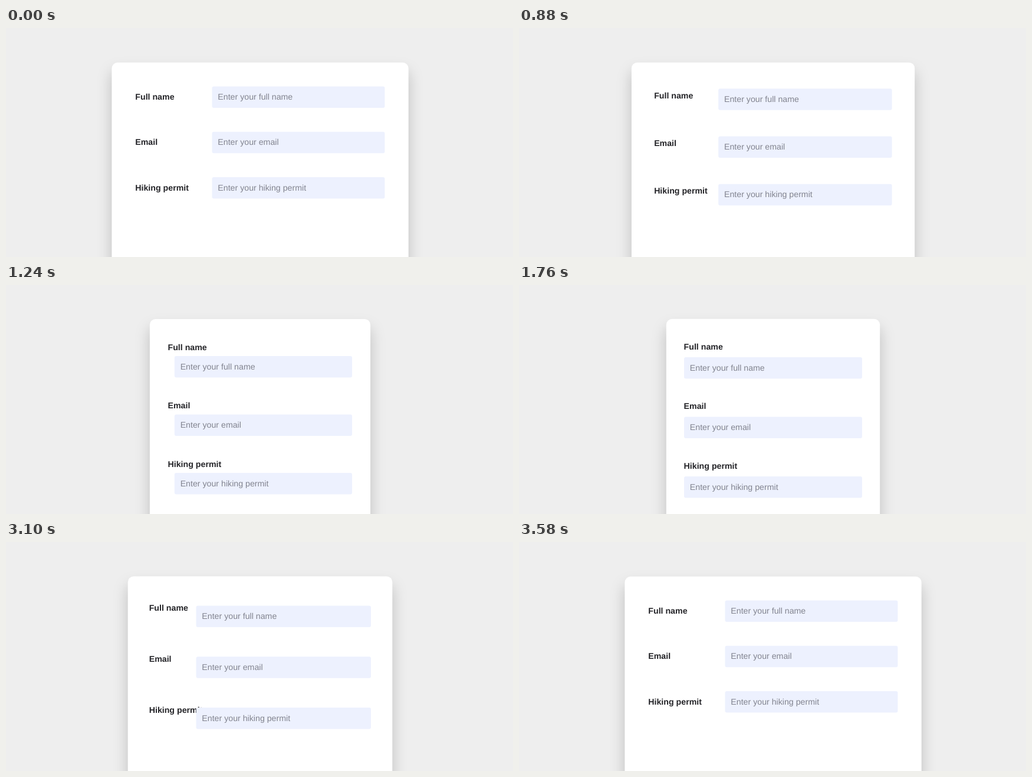
An HTML page that plays this animation: 860 by 390 pixels, repeating every 3.76 s.

```html
<!DOCTYPE html>
<html lang="en">
<head>
<meta charset="utf-8">
<title>Responsive form</title>
<style>
  html, body { margin: 0; width: 100%; height: 100%; overflow: hidden; background: #eee; }
  svg { display: block; width: 860px; height: 390px; }
  text { font: 14.2px "Liberation Sans", Arial, sans-serif; text-rendering: geometricPrecision; }
  .card { fill: #fff; filter: drop-shadow(0 15px 12px rgba(0, 0, 0, .2)); }
  .label { font-weight: 700; fill: #242428; }
  .field { fill: #edf1fe; }
  .hint { fill: #82848f; }
</style>
</head>
<body>
<svg viewBox="0 0 860 390"></svg>
<script>
const LOOP = 3760, STEP = 40;
const NARROW_AT = 880, WIDEN_AT = 2940;
const LEAD = 45, DURATION = 629, POWER = 2.4;

const svg = document.querySelector('svg');

function add(tag, className, text = '') {
  const node = document.createElementNS('http://www.w3.org/2000/svg', tag);
  node.setAttribute('class', className);
  node.textContent = text;
  return svg.appendChild(node);
}

function place(node, attributes) {
  for (const name in attributes) node.setAttribute(name, attributes[name]);
}

const card = add('rect', 'card');
place(card, { rx: 10, height: 480 });

const rows = ['Full name', 'Email', 'Hiking permit'].map(name => {
  const row = {
    label: add('text', 'label', name),
    field: add('rect', 'field'),
    hint: add('text', 'hint', `Enter your ${name.toLowerCase()}`)
  };
  place(row.field, { rx: 3, height: 36.5 });
  return row;
});

// Eased progress, held on a 40 ms grid.
function progress(elapsed) {
  const time = Math.floor(elapsed / STEP) * STEP + LEAD;
  return 1 - Math.max(0, 1 - time / DURATION) ** POWER;
}

function narrowness(time) {
  if (time < NARROW_AT) return 0;
  if (time < WIDEN_AT) return progress(time - NARROW_AT);
  return 1 - progress(time - WIDEN_AT);
}

function draw(p) {
  const mix = (wide, narrow) => wide + (narrow - wide) * p;
  const left = mix(179.4, 249.8);
  place(card, { x: left, y: mix(58.8, 57.8), width: mix(682.7, 612.2) - left });

  const fieldX = mix(349.5, 280);
  rows.forEach(({ label, field, hint }, i) => {
    const shift = i * mix(77.25, 101.5);
    const fieldY = mix(99.5, 123) + shift;
    place(label, { x: mix(219.3, 279.6), y: mix(122, 109.8) + shift });
    place(field, { x: fieldX, y: fieldY, width: mix(642.5, 582) - fieldX });
    place(hint, { x: fieldX + 9.8, y: fieldY + 22.6 });
  });
}

function tick() {
  draw(narrowness((performance.now() - start) % LOOP));
  requestAnimationFrame(tick);
}

const start = performance.now();
tick();
</script>
</body>
</html>
```
